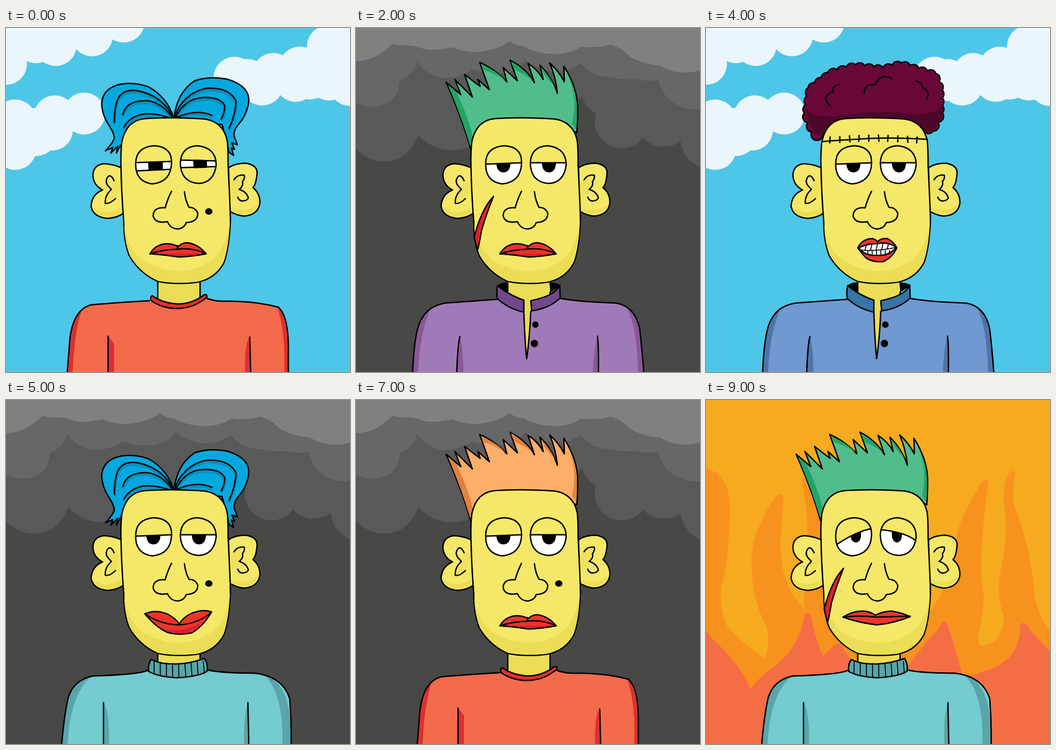
Recreate the animation shown at these times as an HTML page. Size 748 px wide and 748 px high, loop 10000 ms.

```html
<!DOCTYPE html>
<html lang="en">
<head>
<meta charset="utf-8">
<title>Portraits</title>
<style>
html, body { margin: 0; width: 100%; height: 100%; overflow: hidden; }
svg { display: block; width: 100vw; height: 100vh; }
.scene { visibility: hidden; animation: show 10s step-end infinite; }
@keyframes show { 0% { visibility: visible; } 10%, 100% { visibility: hidden; } }
.ink { stroke: #000; stroke-width: 3; stroke-linecap: round; stroke-linejoin: round; }
.line { fill: none; }
.thin { stroke-width: 2; }
.skin { fill: #f5e868; }
.tan { fill: #ebdd55; }
.hair { fill: var(--hair); }
.hair-dark { fill: var(--hair-dark); }
.strand-shade { fill: none; stroke: var(--hair-dark); stroke-width: 7; }
.cloth { fill: var(--cloth); }
.cloth-dark { fill: var(--cloth-dark); }
.collar { fill: var(--collar); }
.lip { fill: #ee342b; }
.lip-dark { fill: #d3222b; }
.white { fill: #fff; }
</style>
</head>
<body>
<svg id="stage" viewBox="0 0 748 748">
<defs>
  <linearGradient id="dusk" x2="0" y2="1">
    <stop offset="0" stop-color="#0f4878"/><stop offset=".22" stop-color="#104273"/>
    <stop offset=".6" stop-color="#132b53"/><stop offset="1" stop-color="#060e30"/>
  </linearGradient>
  <path id="eyeShape" d="M282 295Q282 259 322 256Q361 258 360 293Q359 335 318 339Q281 334 282 295zM379 293Q381 258 416 256Q457 260 457 298Q452 337 418 338Q380 335 379 293z"/>
  <clipPath id="eyeClip"><use href="#eyeShape"/></clipPath>

  <!-- backgrounds -->
  <g id="sky">
    <path fill="#4ec6e7" d="M0 0H748V748H0z"/>
    <g fill="#eaf6fb">
      <path d="M0 0H290L250 10L180 20L110 40L50 60L0 90zM0 180L100 170L175 170L180 210L60 250L0 280zM495 90L640 70L700 0H748V150L560 140z"/>
      <path stroke="#eaf6fb" stroke-width="91" stroke-linecap="round" d="M0 78h0M65 31h0M108 37h0M187 16h0M256-14h0M20 201h0M20 263h0M65 233h0M100 221h0M106 192h0M170 186h0M497 108h0M525 113h0M557 123h0M581 100h0M639 86h0M630 115h0M660 110h0M700 40h0M702 112h0M748 124h0"/>
    </g>
  </g>
  <g id="storm">
    <path fill="#484846" d="M0 0H748V748H0z"/>
    <path fill="#595959" d="M0 262Q25 290 62 291Q112 290 136 233Q165 265 207 266Q235 265 250 256Q310 240 320 190Q440 210 491 148Q500 174 522 186A58 58 0 0 0 624 238Q642 258 667 258Q690 258 706 246Q710 285 748 303V0H0z"/>
    <path fill="#676767" d="M0 162Q18 171 38 171Q92 168 95 115Q125 103 133 73Q155 107 195 109Q235 106 252 90Q340 115 368 70Q430 115 489 76Q510 106 555 107Q580 114 610 111Q635 118 657 112Q672 172 735 177L748 176V0H0z"/>
    <path fill="#80807f" d="M0 72Q42 72 79 34L95 38Q112 36 132 40Q155 51 185 46L210 42Q232 52 262 52Q310 48 334 28Q347 39 365 40Q388 55 435 57Q470 55 490 40Q505 44 515 41Q535 42 553 36Q580 44 592 60Q620 78 662 82Q685 97 716 97Q735 97 748 92V0H0z"/>
  </g>
  <g id="night" fill="#f2f7fb"><path fill="url(#dusk)" d="M0 0H748V748H0z"/></g>
  <g id="fire">
    <path fill="#f6aa1f" d="M0 0H748V748H0z"/>
    <path fill="#f7921e" d="M0 148Q50 162 52 230Q50 345 36 395Q25 440 45 490Q80 530 127 563Q143 520 130 490Q98 430 99 345Q100 285 152 209Q161 200 168 211Q166 255 162 300Q160 380 190 425Q202 442 213 455L214 415Q225 300 218 235L208 172H216L270 300L485 460Q530 410 542 315Q543 270 599 180Q606 167 614 180Q605 240 601 300Q594 380 604 425Q604 460 592 510Q590 533 600 534Q645 532 648 470Q628 425 643 360Q658 290 647 215Q646 185 658 160Q668 148 673 160Q665 200 668 225Q702 310 711 390Q715 465 748 503V748H0z"/>
    <path fill="#f46e45" d="M0 503L10 515Q75 575 97 628Q115 602 155 575Q205 530 214 468Q221 458 229 470Q237 520 254 556L280 532Q292 524 300 543L330 590H430L484 520Q505 500 512 485Q520 477 526 490Q545 550 557 597Q575 601 595 593Q662 575 677 530Q685 500 682 490Q689 480 698 490Q720 520 748 545V748H0z"/>
  </g>

  <!-- hair -->
  <path id="strands" d="M363 193Q342 153 300 140Q255 126 242 157Q235 180 236 205M361 194Q340 163 308 158Q262 156 254 188M352 194Q290 174 262 207L256 216M366 194Q385 142 435 131Q485 128 500 158Q500 185 485 218M369 194Q390 152 430 151Q468 150 476 170Q475 185 468 198M372 194Q415 175 448 190"/>
  <g id="wings">
    <g class="ink hair">
      <path d="M365 196Q350 150 310 128Q280 117 250 122Q210 130 208 165Q209 190 226 215Q237 233 235 241Q230 253 216 267L232 260L228 272L243 257L240 272L252 250L285 202z"/>
      <path d="M365 196Q372 140 410 115Q440 104 480 111Q528 125 528 157Q525 188 505 210Q494 224 496 235L503 254L491 250L497 264L490 261L495 277L485 270L470 210z"/>
    </g>
    <use href="#strands" class="strand-shade" y="4"/>
    <use href="#strands" class="ink line"/>
  </g>
  <g id="spikes">
    <path class="ink hair" d="M249 262Q232 200 196 118L228 145L215 112L253 150L236 101L270 127L265 112L290 134L269 75Q300 88 328 117L320 86L351 115L335 70Q370 88 388 119L374 77Q395 90 407 112L400 81Q425 105 438 142Q434 105 421 76Q440 92 453 117L452 83Q482 130 482 175Q482 205 480 228L440 205H300z"/>
    <path class="hair-dark" d="M248 256Q230 195 200 124L218 139Q245 195 254 238zM456 93Q480 135 480 180L478 222L470 208Q484 145 456 93zM273 80Q305 92 325 114Q295 95 278 92zM337 74Q365 88 384 113Q355 94 344 91zM403 86Q422 105 433 130L410 102z"/>
  </g>
  <g id="curls">
    <path id="curlShape" class="ink hair"/>
    <path class="hair-dark" d="M214 168Q228 200 300 190Q385 177 440 186Q490 194 516 168L512 198L494 224L478 226L440 202H300L250 236L232 226z"/>
    <path class="ink line" d="M270 170Q253 152 267 143Q274 138 276 140Q274 125 290 123M344 142Q345 120 368 123Q380 97 404 110M457 116Q470 118 470 129Q488 136 480 155"/>
  </g>

  <!-- clothes -->
  <g id="crew">
    <path class="cloth" d="M133 750Q137 700 139 675Q147 612 185 602Q240 597 312 593Q373 630 437 588Q455 595 480 594Q545 594 592 607Q613 625 613 690V750z"/>
    <path class="cloth-dark" d="M133 750Q138 690 140 670Q147 625 165 612Q148 665 145 750zM590 607Q608 660 605 750H614Q617 630 590 607zM222 670L235 686V750H222zM530 672Q518 685 520 750H531z"/>
    <path class="ink line" d="M133 750Q137 700 139 675Q147 612 185 602Q240 597 312 593M437 588Q455 595 480 594Q545 594 592 607Q613 625 614 690V750M222 670V750M530 672L532 750"/>
    <path class="ink collar" d="M318 582Q312 585 316 593Q340 610 373 610Q410 609 437 585Q437 578 431 580Q405 600 373 600Q340 598 318 582z"/>
  </g>
  <g id="henley">
    <path class="tan" d="M331 545V574L365 592V618L371 719L381 617V592L422 573V545z"/>
    <path class="cloth" d="M123 750Q127 655 143 632Q158 604 195 598L307 590Q330 610 365 617Q367 680 371 719Q377 680 380 616Q420 611 444 588Q490 596 565 598Q607 605 617 655Q622 700 626 750z"/>
    <path class="cloth-dark" d="M124 750Q128 655 144 632Q149 616 164 607Q138 660 135 750zM588 606Q612 650 613 750H626Q623 620 588 606zM219 750Q221 690 226 671Q234 700 233 750zM525 670Q517 700 515 750H528z"/>
    <path class="ink line" d="M123 750Q127 655 143 632Q158 604 195 598L307 590M444 588Q490 596 565 598Q607 605 617 655Q622 700 626 750M219 750Q221 690 226 671M525 670Q528 690 527 750M365 617Q367 680 371 719Q377 680 380 616"/>
    <path class="ink" d="M310 560Q318 554 330 555V572zM422 555Q436 555 443 560L424 572z"/>
    <path class="ink collar" d="M308 560Q305 572 307 588Q330 610 365 618V592Q330 579 308 560zM443 559Q434 582 380 593L382 615Q420 610 444 587z"/>
    <circle cx="390" cy="645" r="7"/><circle cx="388" cy="686" r="8"/>
  </g>
  <g id="turtle">
    <path class="cloth" d="M121 750Q126 690 135 648Q147 608 190 600Q290 597 308 588H438Q470 594 540 594Q602 601 617 650Q621 700 620 750z"/>
    <path class="cloth-dark" d="M122 750Q126 690 136 648Q147 613 184 602Q138 645 134 750zM563 599Q604 640 601 750H620Q623 615 563 599zM212 658Q226 680 224 750H212zM526 658Q516 690 518 750H528z"/>
    <path class="ink line" d="M121 750Q126 690 135 648Q147 608 190 600Q290 597 308 588M438 587Q470 594 540 594Q602 601 617 650Q621 700 620 750M212 658V750M526 658L528 750"/>
    <path class="ink collar" d="M316 564Q309 572 310 590Q330 602 373 604Q420 601 437 590Q440 575 432 562Q400 573 373 574Q335 575 316 564z"/>
    <path id="ribs" class="ink line thin"/>
  </g>

  <!-- eyes -->
  <g id="half">
    <g clip-path="url(#eyeClip)">
      <path class="white" d="M270 294H370V350H270zM370 293H470V350H370z"/>
      <path d="M305 294H336Q335 314 320 314Q306 313 305 294zM404 293H435Q434 314 419 314Q405 313 404 293z"/>
    </g>
    <path class="ink line" d="M283 296L360 293M380 293H456"/>
  </g>
  <g id="band">
    <g clip-path="url(#eyeClip)">
      <path class="ink white" d="M275 293L365 290V307L275 311zM372 287L462 289V301L372 304z"/>
      <path d="M309 291L341 290V308L310 310zM407 286L437 287V304L408 305z"/>
    </g>
  </g>
  <g id="sleepy">
    <g clip-path="url(#eyeClip)">
      <path class="white" d="M278 317Q322 287 364 278V350H278zM376 279Q435 286 462 309V350H376z"/>
      <path d="M315 295L337 286Q339 308 326 310Q314 308 315 295zM404 287L426 290Q427 308 415 310Q403 308 404 287z"/>
    </g>
    <path class="ink line" d="M286 313Q325 287 358 280M382 282Q435 288 456 306"/>
  </g>

  <!-- mouths -->
  <g id="frown">
    <path class="ink lip" d="M313 491Q325 470 350 469Q368 470 374 476Q383 466 395 467Q418 470 435 491Q405 497 375 498Q345 493 313 491z"/>
    <path class="lip-dark" d="M325 490Q375 491 428 490Q400 496 375 496Q350 492 325 490z"/>
    <path class="ink line" d="M313 491Q340 482 373 481Q405 477 435 491M373 473V480"/>
  </g>
  <g id="smile">
    <path class="ink lip" d="M302 465Q325 455 350 465Q368 474 377 487Q385 472 405 463Q430 454 447 461Q430 490 405 506Q375 513 350 505Q325 493 302 465z"/>
    <path class="lip-dark" d="M340 497Q385 508 424 484Q405 506 392 507Q360 510 340 497z"/>
    <path class="ink line" d="M302 465Q335 488 377 489Q420 486 447 461"/>
  </g>
  <g id="teeth">
    <path class="ink lip" d="M330 478Q340 458 362 458Q370 460 373 465Q380 456 395 458Q408 465 415 478Q405 500 385 508Q360 510 347 499Q338 490 330 478z"/>
    <path class="ink white" d="M332 478Q352 468 373 469Q395 464 414 477Q405 488 390 493Q365 497 348 491Q338 486 332 478z"/>
    <path id="gaps" class="ink line thin"/>
  </g>
  <g id="flat">
    <path class="ink lip" d="M298 472Q320 458 343 459Q358 460 368 468Q382 460 403 459Q425 462 444 471Q410 485 372 489Q330 484 298 472z"/>
    <path class="ink line" d="M298 472Q330 468 370 472L444 470"/>
  </g>

  <!-- marks -->
  <ellipse id="mole" cx="441" cy="399" rx="8" ry="7"/>
  <g id="scar">
    <path class="ink" fill="#e52528" d="M299 366Q272 395 257 455L264 484Q268 470 273 440Q285 400 299 366z"/>
    <path class="lip-dark" d="M289 382Q269 410 259 455L264 477Q266 425 289 382z"/>
  </g>
  <path id="stitches" class="ink line"/>

  <!-- head -->
  <path id="neck" class="ink tan" d="M330 545V610H422V545"/>
  <g id="head">
    <path class="ink skin" d="M252 305Q238 297 214 295Q190 297 189 320Q190 342 210 352Q186 362 185 388Q190 412 222 414Q244 412 256 402zM484 304Q497 294 522 294Q546 298 546 315Q544 340 537 347Q553 360 552 381Q548 407 517 409Q500 407 486 398z"/>
    <path class="tan" d="M187 388Q215 412 250 390V403Q220 418 198 404zM550 379Q530 404 489 391V397Q535 418 550 379z"/>
    <path class="tan" opacity=".5" d="M235 332L229 351Q214 365 216 381L238 371L250 350V335zM496 330L518 320L507 351L504 368L488 372V335z"/>
    <path class="ink line" d="M235 332Q229 319 223 322Q214 332 221 342L229 351Q214 365 216 381Q224 384 238 371M496 330Q503 318 518 320Q520 327 514 334Q517 343 507 351Q524 356 527 370Q522 377 512 376Q506 374 504 368"/>
    <path class="ink skin" d="M303 197Q360 193 433 198Q473 205 481 245Q483 260 483 300Q488 400 488 420Q485 480 474 510Q456 545 415 553Q370 559 330 551Q290 533 268 495Q256 465 256 420Q251 360 250 300Q249 270 252 247Q262 200 303 197z"/>
    <path class="tan" d="M257 430Q264 480 300 507Q340 528 375 528Q430 527 462 490Q480 465 487 420Q484 480 473 509Q455 543 415 552Q370 557 331 550Q291 532 269 494Q258 465 257 430z"/>
    <path class="ink line" d="M360 355Q352 370 346 391Q320 389 320 409Q325 426 351 421Q358 437 374 437Q388 435 392 423Q417 422 417 403Q412 390 398 390Q390 375 388 356"/>
    <use href="#eyeShape" class="skin"/>
  </g>
  <use id="rims" href="#eyeShape" class="ink line"/>
</defs>
</svg>
<script>
const byId = id => document.getElementById(id);
const setPath = (id, d) => byId(id).setAttribute('d', d);
const repeat = (count, draw) => Array.from({ length: count }, (_, i) => draw(i)).join('');
const use = id => `<use href="#${id}"/>`;

let seed = 7;
const random = () => (seed = seed * 16807 % 2147483647) / 2147483647;

const star = (x, y, r) => `<circle cx="${x}" cy="${y}" r="${r}"/>`;
byId('night').innerHTML +=
  [[99, 40], [488, 28], [83, 190], [608, 294], [71, 639], [706, 662]].map(([x, y]) => star(x, y, 2.5)).join('') +
  repeat(95, () => star(random() * 748, random() * 748, .5 + random() ** 2));

// Even bumps along each side of a rough outline
const bumps = ([start, ...corners], size) => {
  let [x, y] = start, d = `M${start}`;
  for (const [cx, cy] of corners) {
    const count = Math.max(1, Math.round(Math.hypot(cx - x, cy - y) / size));
    d += repeat(count, i => {
      const k = (i + 1) / count;
      return `A12 12 0 0 1 ${x + (cx - x) * k} ${y + (cy - y) * k}`;
    });
    [x, y] = [cx, cy];
  }
  return d;
};
setPath('curlShape', bumps([[252, 238], [230, 226], [214, 185], [222, 130], [265, 97], [325, 80],
  [385, 87], [425, 76], [500, 99], [514, 135], [514, 185], [494, 224], [478, 228]], 19) + 'L440 200H300z');

setPath('ribs', repeat(9, i => {
  const x = 322 + i * 13.4, sag = 7 * Math.sin((i + 1) / 10 * Math.PI);
  return `M${x} ${566 + sag}l${i - 4 > 0 ? 2 : 0} ${26 + sag * .4}`;
}));
setPath('gaps', 'M336 483Q375 486 413 477' +
  repeat(5, i => `M${349 + i * 12} ${470 - i * .5}l-3 13`) + repeat(6, i => `M${352 + i * 9.4} 484v8`));
setPath('stitches', 'M252 247Q300 243 360 240Q420 238 481 242' +
  repeat(10, i => `M${270 + i * 21} ${237 - 4 * Math.sin(i / 9 * Math.PI)}l${i % 3 - 1} 13`));

const palettes = {
  wings: ['#04a8df', '#0790ba'],
  mint: ['#52bd8c', '#22a465'],
  ginger: ['#fdae68', '#e0813f'],
  curls: ['#690739', '#4d0729'],
  crew: ['#f36b4b', '#dc3030', '#de302f'],
  violet: ['#a07ab8', '#8a5797', '#70498c'],
  blue: ['#7098d1', '#4e74a8', '#3974a6'],
  green: ['#87c992', '#4da46c', '#5b9d60'],
  turtle: ['#74cbd0', '#59a5aa', '#59a5aa']
};
// background, hair, hair colour, eyes, mouth, mark, clothes, clothes colour
const scenes = [
  'sky wings wings band frown mole crew crew',
  'sky curls curls half frown mole turtle turtle',
  'storm spikes mint half frown scar henley violet',
  'night spikes ginger band smile mole crew crew',
  'sky curls curls half teeth stitches henley blue',
  'storm wings wings half smile mole turtle turtle',
  'fire spikes mint band frown stitches henley green',
  'storm spikes ginger half frown mole crew crew',
  'night curls curls band flat mole henley violet',
  'fire spikes mint sleepy flat scar turtle turtle'
];
stage.insertAdjacentHTML('beforeend', scenes.map((scene, i) => {
  const [back, hair, tint, eyes, mouth, mark, clothes, dye] = scene.split(' ');
  const [h, hd] = palettes[tint], [c, cd, co] = palettes[dye];
  const style = `animation-delay:${i - 10}s;--hair:${h};--hair-dark:${hd};--cloth:${c};--cloth-dark:${cd};--collar:${co}`;
  const layers = [back, 'neck', clothes, hair, 'head', eyes, 'rims', mouth, mark];
  return `<g class="scene" style="${style}">${layers.map(use).join('')}</g>`;
}).join(''));
</script>
</body>
</html>
```
